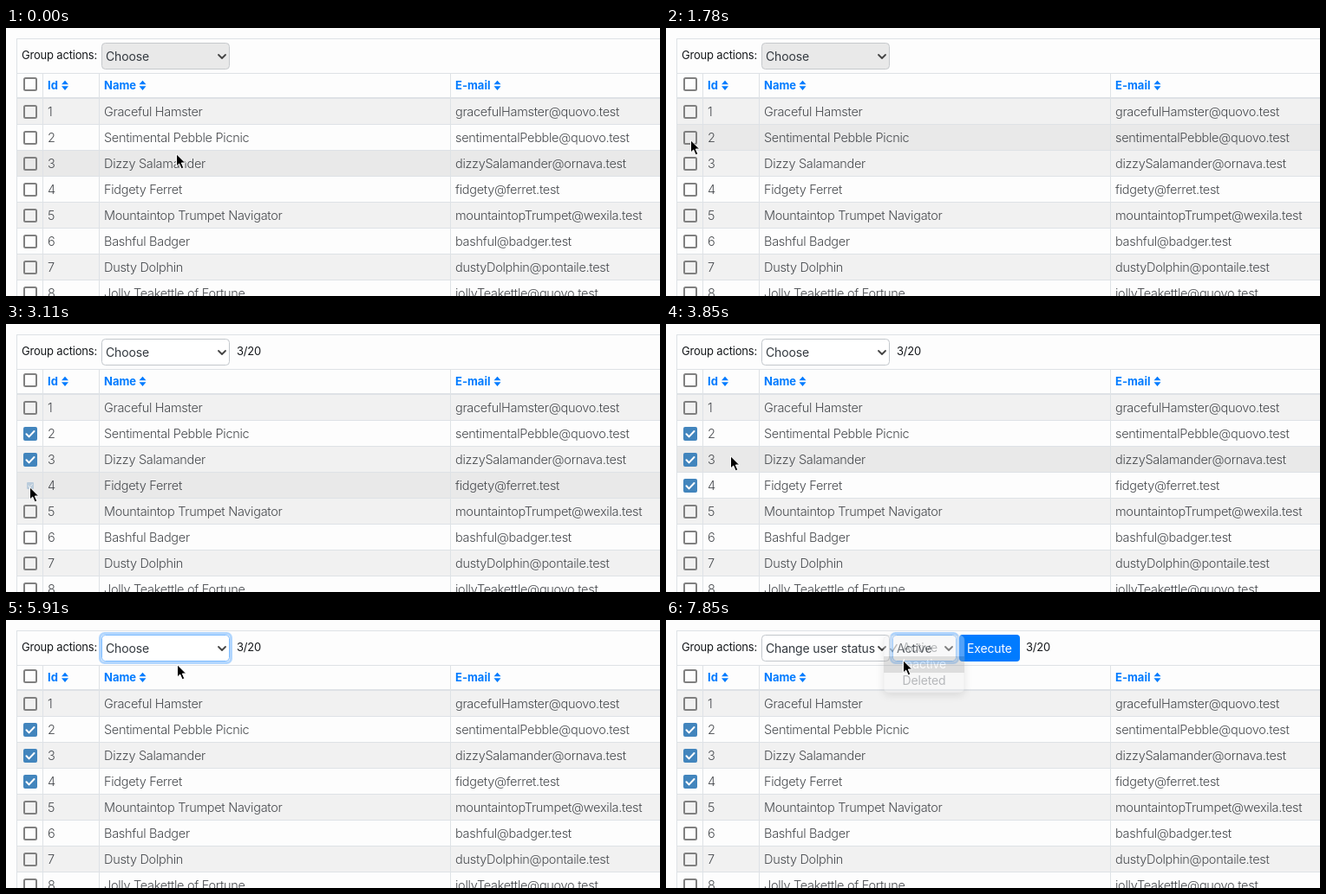
Animation of 754 by 310 pixels, one loop 7.99 s. Source, as an HTML page:

```html
<!DOCTYPE html>
<html lang="en">
<head>
<meta charset="utf-8">
<title>Group actions</title>
<style>
html, body { margin: 0; width: 100%; height: 100%; overflow: hidden; background: #fdfdfd; }
svg { display: block; width: 754px; height: 310px; font-family: Inter, Roboto, sans-serif; }
text { font-size: 14px; letter-spacing: -.01em; fill: #343a40; white-space: pre; }
.cell { font-size: 14.5px; font-weight: 300; letter-spacing: -.02em; fill: #484b4f; }
.head { font-size: 13px; font-weight: 700; letter-spacing: 0; fill: #007bff; }
.small { font-size: 13px; letter-spacing: -.015em; fill: #16191c; }
.line { fill: #dee2e6; }
.box { fill: none; stroke: #808080; stroke-width: 2; }
.mark { fill: none; stroke-linecap: round; stroke-linejoin: round; }
.field { fill: #fff; stroke: #c2c7cc; }
.field.off { fill: #e9e9e9; stroke: #c6c9cc; }
.focus .field { stroke: #80bdff; }
.ring { fill: none; stroke: #007bff; stroke-opacity: .3; stroke-width: 3; visibility: hidden; }
.focus .ring { visibility: inherit; }
.menu { filter: drop-shadow(0 3px 5px rgba(0, 0, 0, .28)); }
.menu .panel { fill: #ececee; stroke: #c9c9cb; stroke-width: .6; }
.menu .bar { fill: none; }
.menu .tick { fill: none; stroke: #3c3c3c; stroke-width: 1.5; }
.menu .on .bar { fill: #a3a3a3; }
.menu .on text { fill: #fff; }
.menu .on .tick { stroke: #fff; }
</style>
</head>
<body>
<svg id="stage" viewBox="0 0 754 310"></svg>
<script>
const LOOP = 7990;
const people = [
  ["Graceful Hamster", "gracefulHamster@quovo.test"],
  ["Sentimental Pebble Picnic", "sentimentalPebble@quovo.test"],
  ["Dizzy Salamander", "dizzySalamander@ornava.test"],
  ["Fidgety Ferret", "fidgety@ferret.test"],
  ["Mountaintop Trumpet Navigator", "mountaintopTrumpet@wexila.test"],
  ["Bashful Badger", "bashful@badger.test"],
  ["Dusty Dolphin", "dustyDolphin@pontaile.test"],
  ["Jolly Teakettle of Fortune", "jollyTeakettle@quovo.test"]
];
const checkTimes = { 2: 1930, 3: 2374, 4: 3110 };

// Cursor runs: first step, last step, then evenly timed positions.
const runs = [
  [0, 0, [196, 145]],
  [600, 1630, [190, 145], [165, 144], [126, 143], [86, 140], [56, 136], [39, 132], [31, 130], [28, 129]],
  [1780, 2820, [28, 129], [28, 129], [28, 139], [28, 157], [28, 157], [28, 157], [28, 171], [28, 182]],
  [2970, 3260, [27, 188], [27, 188], [27, 188]],
  [3550, 4580, [34, 186], [52, 172], [74, 152], [98, 122], [119, 88], [134, 58], [140, 40], [141, 34]],
  [4730, 5020, [141, 33], [170, 44], [197, 51]],
  [5620, 6660, [197, 51], [197, 51], [197, 51], [205, 49], [230, 43], [257, 37], [271, 34], [275, 33]],
  [7400, 7550, [274, 39], [273, 46]]
];

const text = (x, y, str, cls = "", id = "") => `<text x="${x}" y="${y}" class="${cls}" id="${id}">${str}</text>`;
const line = (x, y, w, h) => `<rect class="line" x="${x}" y="${y}" width="${w}" height="${h}"/>`;
const checkbox = y => `<rect class="box" x="21" y="${y - 7}" width="14" height="14" rx="1.5"/>`;
const rowY = n => 52 + 30 * n;

function heading(x, label, iconX) {
  return text(x, 71, label, "head") +
    `<path fill="#007bff" d="M${iconX} 65.3l4-4.6 4 4.6zm0 2h8l-4 4.6z"/>`;
}

function row([name, mail], i) {
  const n = i + 1, y = rowY(n), mid = y + 15;
  return `<rect id="row${n}" x="13" y="${y}" width="741" height="29"/>` + line(12, y + 29, 742, 1) +
    `<g id="empty${n}">${checkbox(mid)}</g>` +
    `<g id="full${n}"><rect x="-8" y="-8" width="16" height="16" rx="2" fill="#4285bd"/>` +
    `<path class="mark" stroke="#fff" stroke-width="2" d="M-4.5 .2l3 3.2 6-6.4"/></g>` +
    text(48, mid + 5, n, "cell") + text(113, mid + 5, name, "cell") + text(518, mid + 5, mail, "cell");
}

function select(id, x, w, label) {
  const chevron = x + w - 13;
  return `<g id="${id}"><rect class="ring" x="${x - 1.5}" y="15.5" width="${w + 3}" height="34" rx="5"/>` +
    `<rect class="field" x="${x + .5}" y="17.5" width="${w - 1}" height="30" rx="4"/>` +
    text(x + 5, 38, label, "", id + "Label") +
    `<path class="mark" stroke="#444" stroke-width="1.8" d="M${chevron} 31l4 4 4-4"/></g>`;
}

function menu(id, x, w, items) {
  const item = (label, i) => `<g><rect class="bar" x="${x}" y="${23 + 19 * i}" width="${w}" height="19"/>` +
    (i ? "" : `<path class="tick" d="M${x + 7.5} 33l2.6 3.4 5.2-8.2"/>`) +
    text(x + 21.5, 37 + 19 * i, label) + "</g>";
  return `<g class="menu" id="${id}"><rect class="panel" x="${x}" y="18" width="${w}" height="66" rx="5"/>` +
    items.map(item).join("") + "</g>";
}

stage.innerHTML =
  people.map(row).join("") +
  line(12, 12, 742, 1) + line(12, 52, 742, 1) + line(12, 80, 742, 2) + line(12, 12, 1, 298) +
  [42, 107, 512].map(x => line(x, 52, 1, 258)).join("") +
  checkbox(65) + heading(48, "Id", 64) + heading(113, "Name", 153.5) + heading(518, "E-mail", 562.5) +
  text(18, 36, "Group actions:", "small") +
  select("action", 110, 148, "Choose") +
  `<g id="extra">${select("status", 261, 74, "Active")}` +
  `<rect x="338" y="17" width="70" height="31" rx="4" fill="#007bff"/>` +
  `<text x="347" y="38" style="fill:#fff">Execute</text></g>` +
  text(266, 36, "", "small", "count") +
  menu("actionMenu", 99, 169, ["Choose", "Change user status", "Send"]) +
  menu("statusMenu", 251, 93, ["Active", "Inactive", "Deleted"]) +
  `<path id="cursor" fill="#000" stroke="#fff" stroke-width="1" stroke-linejoin="round"
    d="M.5 .8V15L3.7 12 6.2 17.8 8.8 16.7 6.3 11H10.7Z"/>`;

const el = id => document.getElementById(id);
const show = (id, on) => el(id).style.visibility = on ? "visible" : "hidden";

function cursorAt(t) {
  const [start, end, ...points] = runs.filter(r => r[0] <= t).pop();
  const last = points.length - 1;
  const step = last ? Math.floor((t - start) / (end - start) * last + .001) : 0;
  return points[Math.min(last, step)];
}

function setMenu(id, opacity, active) {
  show(id, opacity > 0);
  el(id).style.opacity = opacity;
  el(id).querySelectorAll("g").forEach((g, i) => g.classList.toggle("on", i === active));
}

function drawRow(n, t, hover) {
  el("row" + n).setAttribute("fill", hover ? "#e9e9e9" : n % 2 ? "#f1f1f1" : "#fdfdfd");
  const age = t - (checkTimes[n] ?? Infinity), growing = age < 149;
  show("empty" + n, age < 0);
  show("full" + n, age >= 0);
  el("full" + n).setAttribute("transform", `translate(28 ${rowY(n) + 15}) scale(${growing ? .5 : 1})`);
  el("full" + n).setAttribute("opacity", growing ? .28 : 1);
}

function draw(t) {
  const [x, y] = cursorAt(t);
  el("cursor").setAttribute("transform", `translate(${x} ${y})`);
  const hovered = Math.floor((y - 52) / 30);
  people.forEach((_, i) => drawRow(i + 1, t, i + 1 === hovered));

  const count = Object.values(checkTimes).filter(c => t >= c).length;
  const chosen = t >= 6060, picking = t >= 6660;
  el("count").textContent = count ? count + "/20" : "";
  el("count").setAttribute("x", chosen ? 415 : 266);
  el("action").querySelector(".field").classList.toggle("off", !count);
  el("action").classList.toggle("focus", t >= 4730 && !picking);
  el("actionLabel").textContent = chosen ? "Change user status" : "Choose";
  show("extra", chosen);
  el("status").classList.toggle("focus", picking);

  const item = y >= 42 ? 1 : 0;
  setMenu("actionMenu", t < 4730 || t >= 5910 ? 0 : t < 5768 ? 1 : .35, t >= 5620 && t < 5768 ? -1 : item);
  setMenu("statusMenu", !picking ? 0 : t < 7850 ? 1 : .35, item);
}

const began = performance.now();
function tick() {
  draw((performance.now() - began) % LOOP);
  requestAnimationFrame(tick);
}
tick();
</script>
</body>
</html>
```
